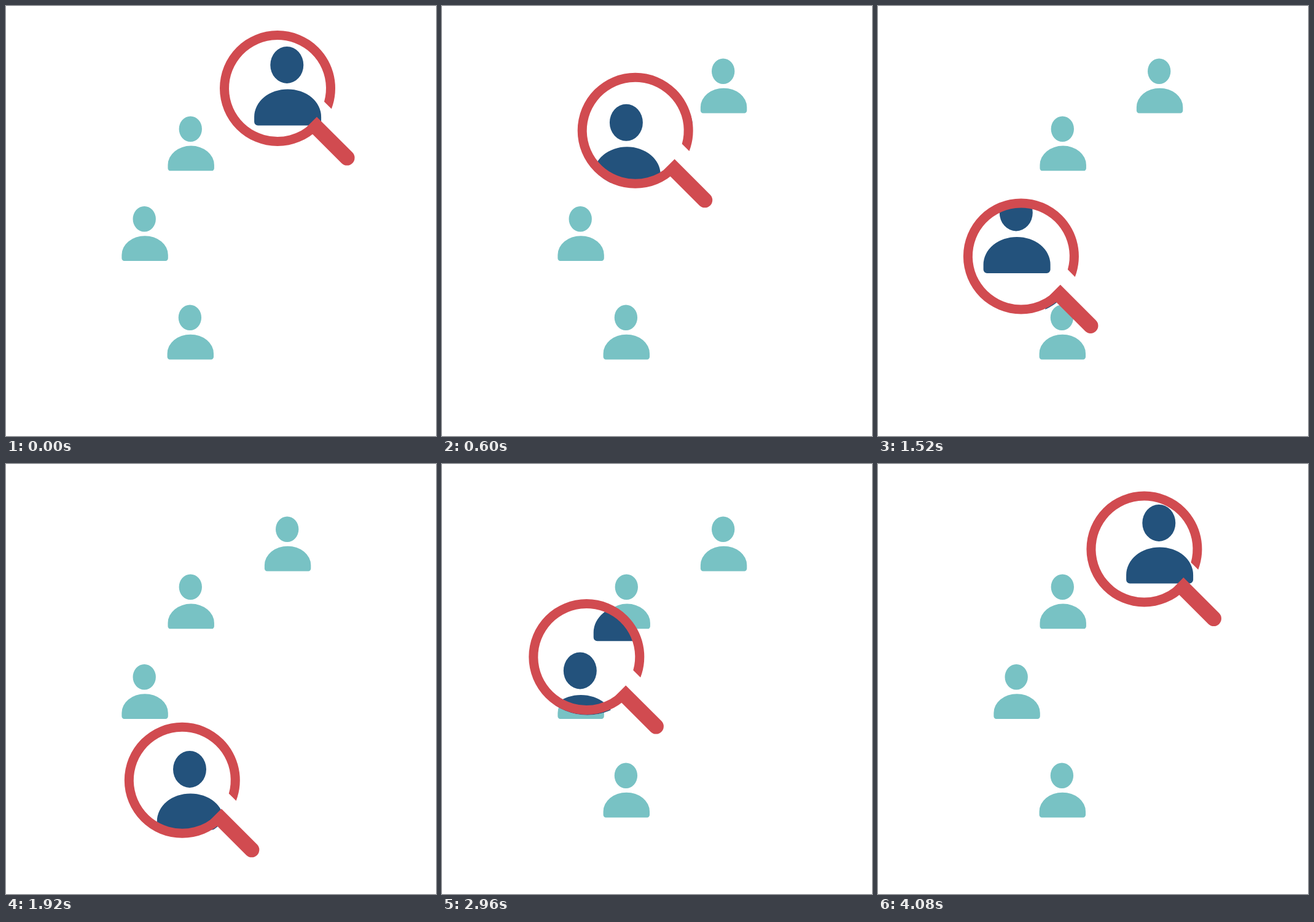
An HTML page with a canvas for the animation above (4.12 s loop, 700x700 px).

```html
<!DOCTYPE html>
<html lang="en">
<head>
<meta charset="utf-8">
<title>Search for people</title>
<style>
  html, body { margin: 0; width: 100%; height: 100%; overflow: hidden; background: #fff; }
  canvas { display: block; width: 700px; height: 700px; }
</style>
</head>
<body>
<canvas id="stage" width="700" height="700"></canvas>
<script>
const ctx = document.getElementById('stage').getContext('2d');
const TEAL = '#78c2c4', NAVY = '#23527c', RED = '#d14b50';
const STEP = 40, STEPS = 103, LAST = 51;
const OUTER = 94, INNER = 79, GRIP = 12.4, REACH = 160;
const TURN = 2 * Math.PI, DIAGONAL = Math.PI / 4;

// head centres of the small figures
const people = [[457.7, 106.3], [300.3, 200.2], [225.2, 346.8], [299.4, 507.3]];

// key points of the lens path
const path = [
  { at: 0, x: 442, y: 134 },
  { at: 15, x: 314.7, y: 202.8 },
  { at: 29, x: 235.3, y: 314 },
  { at: 36, x: 226, y: 386 },
  { at: 48, x: 286.8, y: 514.8 },
  { at: LAST, x: 300, y: 536 }
];

const figure = new Path2D();
const shoulder = { x: 54.5, y: 45 };
figure.ellipse(0, 0, 27, 30, 0, 0, TURN);
figure.roundRect(-53.2, 39.5, 109, 59, [shoulder, shoulder, 6, 6]);

// the ring is cut along a line parallel to the handle
const cutAngle = r => TURN + DIAGONAL - Math.asin(38.4 / r);
const ring = new Path2D();
ring.arc(0, 0, OUTER, DIAGONAL, cutAngle(OUTER));
ring.arc(0, 0, INNER, cutAngle(INNER), DIAGONAL, true);
ring.closePath();

// the handle lies along the x axis and is turned when drawn
const handle = new Path2D();
handle.roundRect(INNER - 1, -GRIP, REACH + GRIP - INNER + 1, 2 * GRIP, [0, GRIP, GRIP, 0]);

function slope(i, axis) {
  const a = path[Math.max(i - 1, 0)], b = path[Math.min(i + 1, path.length - 1)];
  return (b[axis] - a[axis]) / (b.at - a.at);
}

// smooth curve through the key points
function lensAt(step) {
  let i = 0;
  while (i < path.length - 2 && step >= path[i + 1].at) i++;
  const a = path[i], b = path[i + 1], span = b.at - a.at;
  const u = (step - a.at) / span, v = 1 - u;
  return ['x', 'y'].map(axis =>
    a[axis] * (1 + 2 * u) * v * v + b[axis] * (1 + 2 * v) * u * u +
    span * u * v * (slope(i, axis) * v - slope(i + 1, axis) * u));
}

function drawPerson(x, y, scale, color) {
  ctx.save();
  ctx.translate(x, y);
  ctx.scale(scale, scale);
  ctx.fillStyle = color;
  ctx.fill(figure);
  ctx.restore();
}

function drawLens(x, y) {
  ctx.save();
  ctx.beginPath();
  ctx.arc(x + 1.2, y + 1.8, OUTER - 1, 0, TURN);
  ctx.clip();
  ctx.fillStyle = '#fff';
  ctx.fillRect(0, 0, 700, 700);
  for (const [px, py] of people) drawPerson(px - 0.4, py - 10.4, 1, NAVY);
  ctx.restore();

  ctx.save();
  ctx.translate(x, y);
  ctx.fillStyle = RED;
  ctx.fill(ring);
  ctx.rotate(DIAGONAL);
  ctx.fill(handle);
  ctx.restore();
}

function draw(ms) {
  const n = Math.floor(ms / STEP) % STEPS;
  ctx.fillStyle = '#fff';
  ctx.fillRect(0, 0, 700, 700);
  for (const [x, y] of people) drawPerson(x, y, 0.692, TEAL);
  // out along the path, then back
  drawLens(...lensAt(Math.min(n, STEPS - n)));
}

let start = null;
function tick(now) {
  if (start === null) start = now;
  draw(Math.max(0, now - start));
  requestAnimationFrame(tick);
}
draw(0);
requestAnimationFrame(tick);
</script>
</body>
</html>
```
